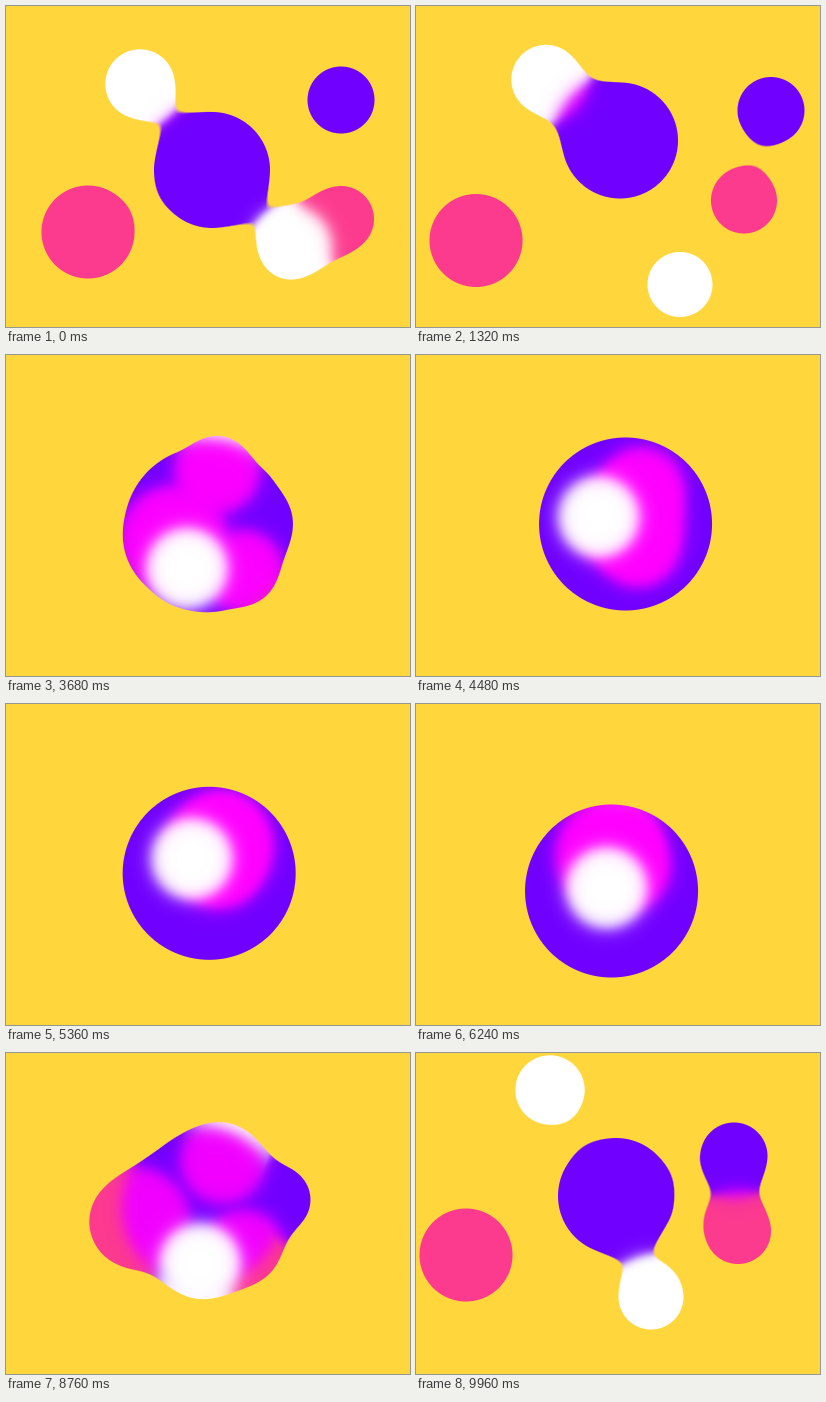
An HTML page with a canvas that plays this animation: 404 px wide and 321 px high, repeating every 10000 ms.

```html
<!DOCTYPE html>
<html lang="en">
<head>
<meta charset="utf-8">
<title>Gooey blobs</title>
<style>
  html, body { margin: 0; width: 100%; height: 100%; overflow: hidden; background: #ffd63b; }
  canvas { display: block; width: 404px; height: 321px; }
</style>
</head>
<body>
<canvas id="stage" width="404" height="321"></canvas>
<script>
const WIDTH = 404, HEIGHT = 321, LOOP = 10000;
const ctx = document.getElementById('stage').getContext('2d');
const image = ctx.createImageData(WIDTH, HEIGHT);
const pixels = image.data;

const YELLOW = [255, 214, 59], PURPLE = [112, 0, 255], PINK = [252, 58, 142], WHITE = [255, 255, 255];

// Poses: start, scattered, docking, inside, inside, emerging, end
const TIMES = [0, 1320, 2880, 4480, 6240, 8760, 9960];
const ball = (r, color, ...poses) => ({ r, color, poses });

const core = ball(58, PURPLE,
  [206, 164], [204, 134.5], [197, 160], [209.5, 169], [195.5, 187], [193.5, 159], [200, 143]);

// Satellite poses are relative to the core
const violet = ball(33.5, PURPLE,
  [129, -70], [151, -30], [98, -16], [10, 0], [0, 0], [75, -7], [118, -40]);
const bigPink = ball(46.5, PINK,
  [-124, 62], [-144, 100], [-80, 30], [4, -4], [-2, -37], [-66, 15], [-150, 59]);
const smallPink = ball(33, PINK,
  [129, 49], [124, 60], [68, 57], [13, 22], [17, -22], [42, 44], [122, 35]);
const upperWhite = ball(34.7, WHITE,
  [-72, -86], [-74, -61], [-5, -83], [16, -34], [8, -45], [21, -46], [-66, -106]);
const lowerWhite = ball(32.5, WHITE,
  [79, 77], [60, 144], [-2, 93], [-27, -7], [-5, -3], [-2, 57], [35, 101]);

const satellites = [violet, bigPink, smallPink, upperWhite, lowerWhite];
const balls = [core, ...satellites];
const tinted = [bigPink, smallPink, upperWhite];
const layers = [...tinted, lowerWhite];

// Smooth curve through the poses
function along(poses, t) {
  const last = poses.length - 1;
  let i = 0;
  while (i < last - 1 && t >= TIMES[i + 1]) i++;
  const span = TIMES[i + 1] - TIMES[i];
  const s = Math.min((t - TIMES[i]) / span, 1), s2 = s * s, s3 = s2 * s;
  const slope = (from, to, c) => (poses[to][c] - poses[from][c]) / (TIMES[to] - TIMES[from]) * span;
  return [0, 1].map(c =>
    poses[i][c] * (2 * s3 - 3 * s2 + 1) + poses[i + 1][c] * (3 * s2 - 2 * s3)
    + slope(Math.max(i - 1, 0), i + 1, c) * (s3 - 2 * s2 + s)
    + slope(i, Math.min(i + 2, last), c) * (s3 - s2));
}

function ramp(from, to, t) {
  const s = Math.min(Math.max((t - from) / (to - from), 0), 1);
  return s * s * (3 - 2 * s);
}

const soft = d => 1 / (1 + Math.exp((d - 8) / 4.3));

function move(t, merged) {
  const swing = Math.PI * (t - 4480) / 1760;
  const [x, y] = along(core.poses, t);
  core.x = x + 12 * merged * Math.sin(2 * swing);
  core.y = y - 11 * merged * Math.sin(swing);
  core.r = 58 + 28.5 * merged;
  for (const b of satellites) {
    const [dx, dy] = along(b.poses, t);
    b.x = core.x + dx;
    b.y = core.y + dy;
  }
}

// Signed distance to the smooth union of all balls
function distance(x, y, blend) {
  let dist = 1e4;
  for (const b of balls) {
    const dx = x - b.x, dy = y - b.y;
    b.d = Math.sqrt(dx * dx + dy * dy) - b.r;
    const h = Math.max(blend - Math.abs(dist - b.d), 0);
    dist = Math.min(dist, b.d) - h * h / (4 * blend);
  }
  return dist;
}

// Purple below, then balls that turn magenta over it, then plain white
function shade(p, cover, magenta) {
  const purple = soft(Math.min(core.d, violet.d));
  let clear = 1 - purple;
  for (const b of layers) {
    b.a = soft(b.d);
    clear *= 1 - b.a;
  }
  for (let c = 0; c < 3; c++) {
    let sum = PURPLE[c] * purple;
    for (const b of layers) {
      const tint = b === lowerWhite ? 0 : purple;
      sum += (b.color[c] + (magenta[c] - b.color[c]) * tint - sum) * b.a;
    }
    pixels[p + c] = YELLOW[c] + (sum / (1 - clear) - YELLOW[c]) * cover;
  }
}

function draw(t) {
  const merged = ramp(2600, 4000, t) * (1 - ramp(8100, 9400, t));
  const blend = Math.max(4, 44 * (1 - merged * merged));
  const magenta = [228 + 27 * merged, 0, 255];
  move(t, merged);
  for (let y = 0, p = 0; y < HEIGHT; y++) {
    for (let x = 0; x < WIDTH; x++, p += 4) {
      const cover = Math.min(Math.max(0.5 - distance(x + 0.5, y + 0.5, blend), 0), 1);
      if (cover > 0) shade(p, cover, magenta);
      else for (let c = 0; c < 3; c++) pixels[p + c] = YELLOW[c];
      pixels[p + 3] = 255;
    }
  }
  ctx.putImageData(image, 0, 0);
}

function tick() {
  draw(performance.now() % LOOP);
  requestAnimationFrame(tick);
}
tick();
</script>
</body>
</html>
```
